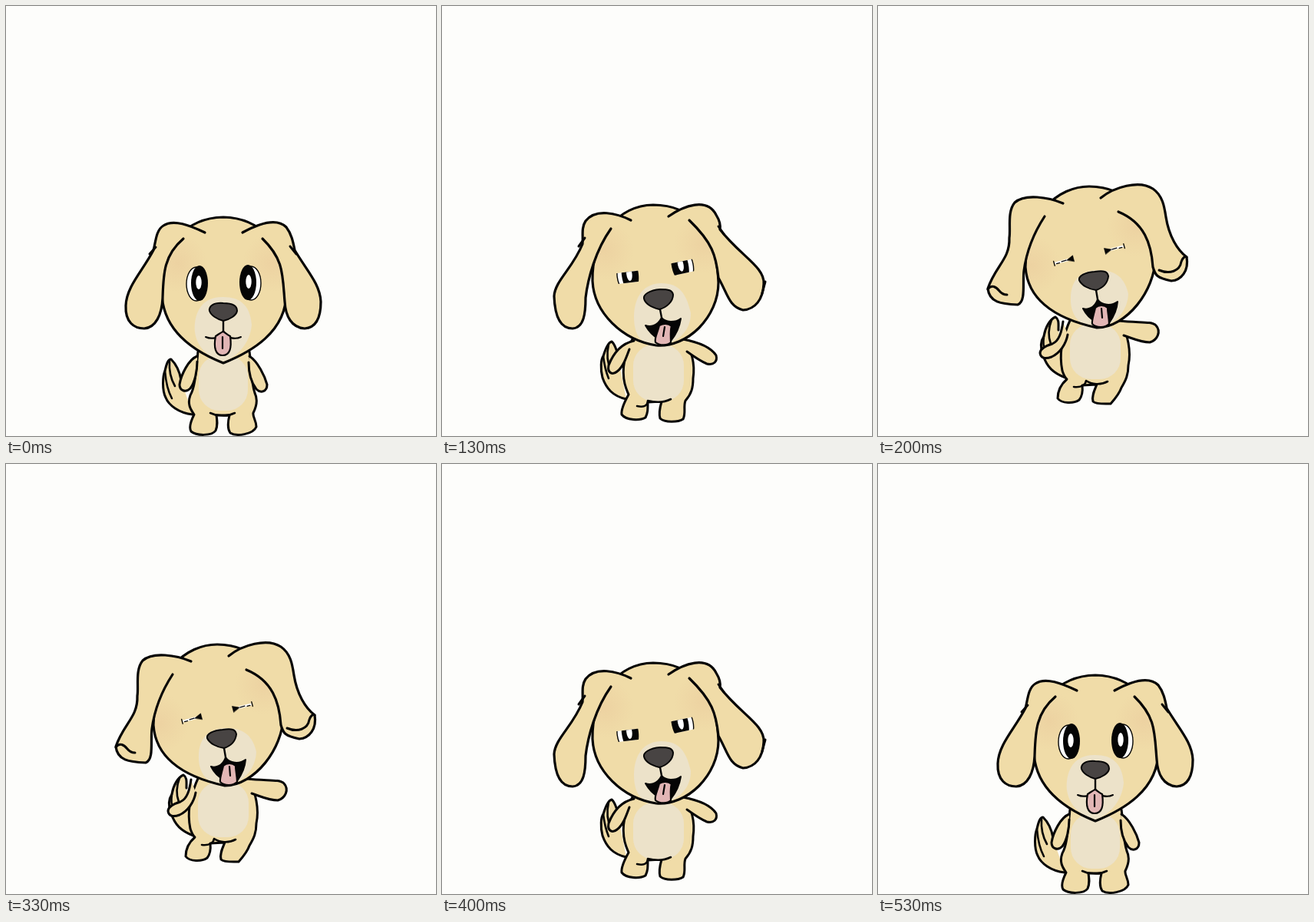
These frames come from a looping animation (560 px wide and 560 px high, 0.6 s). An HTML page with a canvas:

```html
<!DOCTYPE html>
<html lang="en">
<head>
<meta charset="utf-8">
<title>Jumping puppy</title>
<style>
html, body { margin: 0; height: 100%; overflow: hidden; background: #fdfdfb; }
canvas { display: block; }
</style>
</head>
<body>
<canvas id="stage" width="560" height="560"></canvas>
<script>
const ctx = document.getElementById('stage').getContext('2d');
const FUR = '#f0dca8', CREAM = '#ece2c9', INK = '#050505', PINK = '#e2b6b5', NOSE = '#484443';

// Eyes are: x, y, tilt in degrees, upper lid, lower lid.
const stand = {
  tail: 'M243 532 C225 530 212 520 208 510 C203 500 204 482 207 475 C209 466 211 460 215 460 C221 466 226 475 228 487',
  tailHair: 'M207 475 C208 488 210 500 216 511 M213 462 C212 476 216 488 220 495',
  body: 'M250 450 C247 480 246 497 240 507 C236 518 240 525 245 532 C241 540 238 549 241 554 C248 560 268 560 273 553 C276 546 275 540 274 533 L291 533 C289 541 288 550 292 556 C300 561 322 558 326 548 C326 540 321 535 322 530 C327 520 328 512 324 504 C319 490 320 470 317 450',
  crotch: 'M266 530 C270 532 274 533 278 533 C284 534 292 533 298 530',
  belly: '283 491 32 36',
  armL: 'M249 456 C238 460 228 480 226 493 C226 501 234 504 240 498 C246 490 249 475 249 463',
  armR: 'M317 456 C328 463 337 482 340 493 C340 502 332 505 326 499 C319 490 316 478 316 464',
  head: 'M283 275 C235 276 202 310 203 372 C203 425 248 451 283 465 C318 451 366 425 365 372 C366 310 330 276 283 275Z',
  temples: '224 335 346 335',
  muzzle: 'M283 379 C255 378 244 400 246 425 C250 450 270 460 283 463 C300 458 318 440 320 415 C318 390 305 379 283 379Z',
  nose: 'M283 387 C270 386 264 391 265 397 C267 403 275 408 283 410 C292 408 300 403 301 397 C301 390 295 387 283 387Z',
  lip: 'M283 410 L283 423',
  mouth: 'M260 431 C266 434 278 434 283 423 C288 434 300 434 306 431 C296 435 289 433 283 426 C278 434 268 434 260 431Z',
  tongue: 'M273 430 C270 445 273 455 282 455 C292 455 294 445 292 430 C288 428 285 425 283 424 C280 425 276 428 273 430Z',
  tongueLine: 'M282 431 L282 446',
  eyeL: '252 361 0 -24 24',
  eyeR: '315 360 0 -24 24',
  earL: 'M259 295 C240 286 218 277 205 286 C195 292 195 308 192 318 C178 345 157 365 156 390 C155 412 167 420 180 420 C195 419 203 402 204 380 C205 350 205 325 231 303',
  earR: 'M308 295 C328 284 352 275 365 288 C372 297 374 308 376 318 C392 345 409 362 410 385 C410 408 402 419 389 420 C372 419 364 404 363 385 C360 350 362 330 334 303',
  markL: 'M187 323 L195 314',
  markR: 'M370 313 L378 323'
};

const rise = {
  tail: 'M240 512 C222 508 214 498 209 484 C206 472 207 460 210 456 C213 446 217 438 221 437 C225 440 226 446 228 450',
  tailHair: 'M210 456 C211 465 213 475 217 485 M217 441 C214 454 216 466 220 474',
  body: 'M250 430 C236 455 234 475 238 492 C240 500 242 503 243 506 C238 515 233 525 234 532 C240 540 258 540 265 536 C268 530 268 526 268 516 L286 515 C284 522 282 530 284 537 C290 543 308 542 314 538 C318 530 314 522 317 514 C325 505 327 497 327 485 C330 465 325 450 315 430',
  crotch: 'M254 521 C262 523 268 521 268 514 C276 516 288 517 298 512',
  belly: '282 478 33 37',
  armL: 'M250 436 C232 440 222 455 217 468 C215 478 222 481 228 476 C236 470 240 458 244 447',
  armR: 'M314 434 C335 438 350 444 357 455 C359 463 354 468 345 466 C338 463 330 458 319 450',
  head: 'M275 259 C230 260 195 300 196 358 C198 400 235 435 279 442 C320 445 360 405 360 360 C358 295 325 259 275 259Z',
  temples: '212 318 340 310',
  muzzle: 'M285 361 C258 362 250 385 250 405 C250 435 265 442 280 442 C305 440 324 425 324 400 C318 375 310 361 285 361Z',
  nose: 'M284 369 C270 370 262 376 263 381 C265 389 275 393 283 395 C292 393 301 385 301 376 C300 370 295 369 284 369Z',
  lip: 'M284 395 L286 406',
  mouth: 'M265 416 C270 418 280 418 286 406 C291 412 303 413 311 407 C309 420 303 430 298 436 C290 440 274 432 265 416Z',
  tongue: 'M283 416 C281 425 276 433 278 438 C284 443 294 442 298 438 C298 430 297 422 299 417 C297 415 294 414 291 414 C288 414 285 415 283 416Z',
  tongueLine: 'M290 418 L288 430',
  eyeL: '245 350 -7 -4 10',
  eyeR: '310 338 -12 -5 11',
  earL: 'M246 279 C228 270 200 263 187 280 C181 289 184 300 183 310 C170 342 147 358 146 378 C147 405 155 420 170 420 C185 419 187 400 187 380 C190 355 200 318 220 290',
  earR: 'M295 274 C315 260 345 249 357 272 C362 280 363 285 362 291 C388 325 421 340 419 362 C418 382 408 395 392 396 C374 392 372 375 360 354 C357 325 352 308 322 279',
  markL: 'M178 313 L186 302',
  markR: 'M360 287 L367 297 M421 359 L417 374'
};

const leap = {
  tail: 'M244 484 C228 478 220 470 215 455 C211 445 212 436 216 430 C218 418 224 408 231 405 C236 408 235 414 235 422',
  tailHair: 'M216 430 C215 438 215 443 217 447 M226 409 C221 422 222 432 225 440',
  body: 'M252 405 C238 435 236 455 240 475 C243 484 245 485 246 486 C238 493 234 500 234 511 C239 518 255 518 262 513 C266 508 267 503 266 494 L285 493 C282 500 278 508 280 515 C284 519 296 518 303 518 C310 510 315 503 317 497 C323 487 326 480 326 468 C330 450 326 430 314 402',
  crotch: 'M255 496 C264 497 270 494 271 488 C278 493 290 494 299 489',
  belly: '283 450 33 36',
  armL: 'M241 411 C239 425 236 436 227 440 C217 443 211 447 211 452 C212 459 218 460 226 457 C237 452 245 440 247 428',
  armR: 'M314 410 C340 413 356 410 362 416 C369 424 364 435 354 438 C342 438 335 434 320 429',
  head: 'M275 235 C235 235 193 270 192 340 C195 385 235 408 285 419 C325 418 360 370 361 330 C360 275 325 235 275 235Z',
  temples: '200 338 336 288',
  muzzle: 'M288 344 C262 343 251 360 251 380 C250 405 265 418 285 420 C308 416 325 398 326 375 C322 355 310 344 288 344Z',
  nose: 'M282 346 C270 347 261 351 262 357 C265 364 275 369 284 370 C293 367 299 361 300 352 C299 346 295 344 282 346Z',
  lip: 'M284 370 L286 382',
  mouth: 'M267 394 C272 396 282 394 286 382 C291 390 304 391 312 385 C311 398 306 406 301 413 C292 417 275 410 267 394Z',
  tongue: 'M283 393 C281 402 278 410 279 414 C285 420 296 419 301 414 C301 406 299 400 299 393 C297 391 294 390 291 390 C288 390 285 391 283 393Z',
  tongueLine: 'M291 394 L292 406',
  eyeL: '242 332 -15 0 0',
  eyeR: '308 316 -15 0 0',
  earL: 'M241 257 C222 249 191 244 178 256 C168 268 173 290 171 302 C172 330 153 338 143 368 C145 386 160 388 182 389 C193 385 188 360 190 345 C193 322 202 297 217 274',
  earR: 'M290 250 C307 236 340 226 358 238 C371 247 373 262 375 275 C379 300 390 318 402 327 C405 345 395 357 382 358 C362 354 361 350 358 340 C356 310 347 282 313 268',
  markL: 'M143 369 C148 362 154 366 158 371 Q162 376 168 376',
  markR: 'M366 344 C380 350 393 345 395 333 Q398 325 402 327'
};

const peak = { ...leap, lift: -25, splay: 4 };

const numbers = text => text.split(' ').map(Number);

// Blend two poses whose paths share the same commands.
function blend(from, to, amount) {
  const pose = {};
  for (const part in from) {
    const ends = to[part].match(/-?[\d.]+/g);
    let i = 0;
    pose[part] = from[part].replace(/-?[\d.]+/g, n => +n + (ends[i++] - n) * amount);
  }
  return pose;
}

function paint(path, fill, width = 3) {
  const shape = new Path2D(path);
  if (fill) { ctx.fillStyle = fill; ctx.fill(shape); }
  if (width) { ctx.lineWidth = width; ctx.stroke(shape); }
}

function oval(x, y, rx, ry, fill, width = 0) {
  ctx.beginPath();
  ctx.ellipse(x, y, rx, ry, 0, 0, 7);
  ctx.fillStyle = fill;
  ctx.fill();
  if (width) { ctx.lineWidth = width; ctx.stroke(); }
}

function belly(data) {
  const [x, y, rx, ry] = numbers(data);
  ctx.beginPath();
  ctx.roundRect(x - rx, y - ry, 2 * rx, 2 * ry, 27);
  ctx.fillStyle = CREAM;
  ctx.fill();
}

function blush(x, y) {
  const glow = ctx.createRadialGradient(x, y, 0, x, y, 38);
  glow.addColorStop(0, 'rgba(232, 196, 152, .4)');
  glow.addColorStop(1, 'rgba(232, 196, 152, 0)');
  oval(x, y, 38, 38, glow);
}

function eye(data, mirror) {
  const [x, y, tilt, top, bottom] = numbers(data);
  ctx.save();
  ctx.translate(x, y);
  ctx.rotate(tilt * Math.PI / 180);
  ctx.scale(mirror, 1);
  if (bottom > top) {
    ctx.beginPath();
    ctx.rect(-25, top, 50, bottom - top);
    ctx.clip();
    oval(-4, 1, 13, 22, '#fff', 1.4);
    oval(0, 0, 11, 23, INK);
    oval(-1, -1, 3.7, 9, '#fff');
  } else {
    paint('M-12 -1.5 H6 V1.5 H-12Z', '#fff', 0);
    paint('M4 0 L13 -4 V4Z', INK, .5);
    paint('M-13 -3 V3 M-10 1 H-6 M-3 0 H3', null, 1.3);
  }
  ctx.restore();
}

function ear(path, mark, x, y, degrees) {
  ctx.save();
  ctx.translate(x, y);
  ctx.rotate(degrees * Math.PI / 180);
  ctx.translate(-x, -y);
  paint(path, FUR, 3.2);
  paint(mark, null, 3);
  ctx.restore();
}

function draw(pose) {
  const splay = pose.splay || 0;
  ctx.fillStyle = '#fdfdfb';
  ctx.fillRect(0, 0, 560, 560);
  ctx.save();
  ctx.translate(0, pose.lift || 0);
  ctx.strokeStyle = INK;
  ctx.lineCap = ctx.lineJoin = 'round';

  paint(pose.tail, FUR);
  paint(pose.tailHair, null, 2.6);
  paint(pose.body, FUR);
  belly(pose.belly);
  paint(pose.crotch, null, 2.6);
  paint(pose.armL, FUR);
  paint(pose.armR, FUR);

  paint(pose.head, FUR, 0);
  ctx.save();
  ctx.clip(new Path2D(pose.head));
  const [lx, ly, rx, ry] = numbers(pose.temples);
  blush(lx, ly);
  blush(rx, ry);
  paint(pose.muzzle, CREAM, 0);
  ctx.restore();
  paint(pose.head, null, 3.2);

  paint(pose.lip, null, 2.4);
  paint(pose.mouth, INK, 2);
  paint(pose.tongue, PINK, 2.2);
  paint(pose.tongueLine, null, 2.2);
  paint(pose.nose, NOSE, 2);
  eye(pose.eyeL, 1);
  eye(pose.eyeR, -1);
  ear(pose.earL, pose.markL, 200, 270, splay);
  ear(pose.earR, pose.markR, 350, 255, -splay);
  ctx.restore();
}

const start = blend(stand, rise, 0.5);
const sequence = [stand, start, rise, leap, peak, leap, rise, start, stand];
const ends = [60, 130, 200, 260, 330, 400, 460, 530, 600];

function tick() {
  const time = performance.now() % 600;
  draw(sequence[ends.findIndex(end => time < end)]);
  requestAnimationFrame(tick);
}
tick();
</script>
</body>
</html>
```
